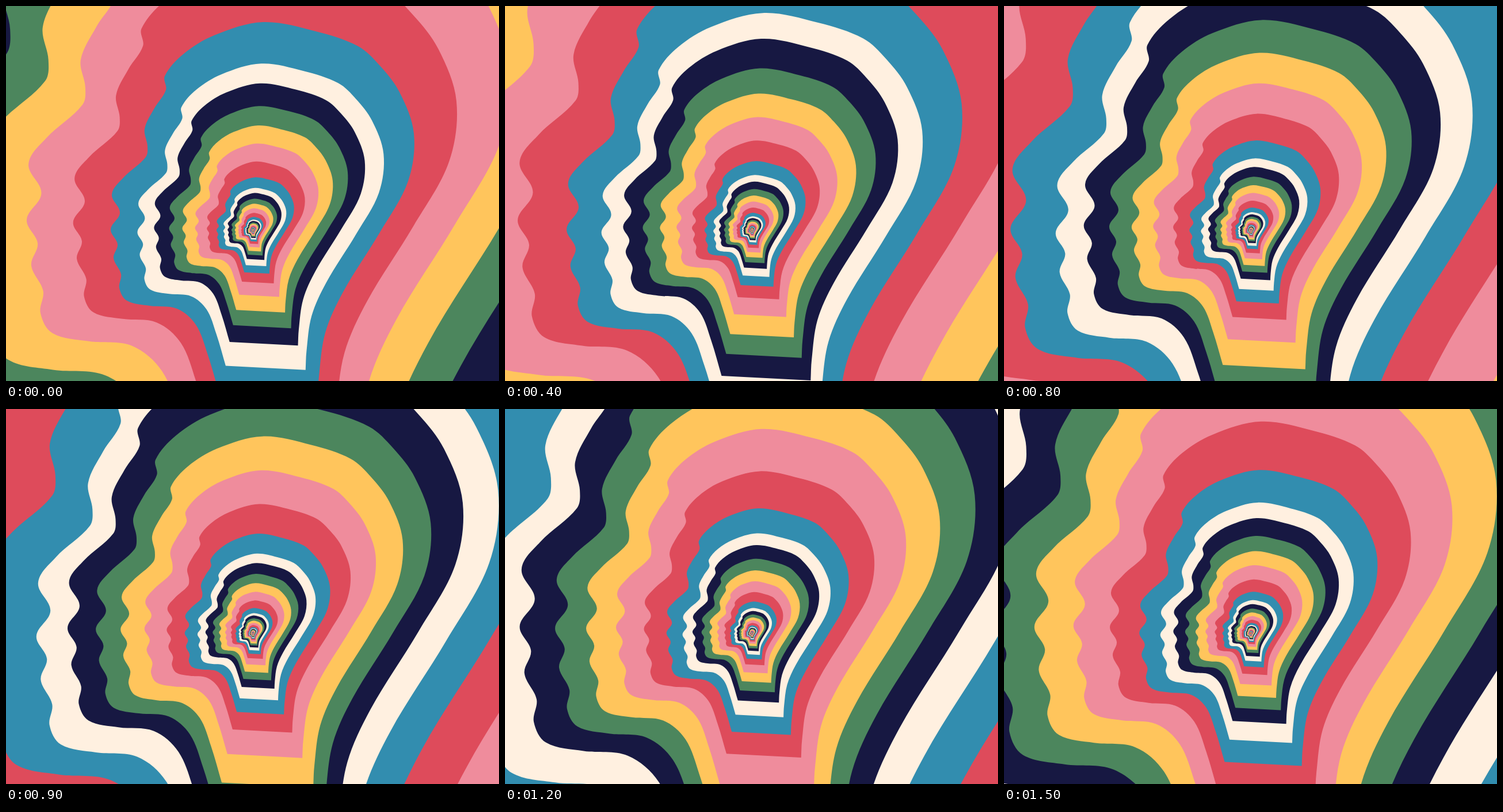
An HTML page with a canvas for the animation above (1.6 s loop, 857x653 px).

```html
<!DOCTYPE html>
<html lang="en">
<head>
<meta charset="utf-8">
<title>Endless heads</title>
<style>
  html, body { margin: 0; width: 100%; height: 100%; overflow: hidden; background: #328daf; }
  canvas { display: block; }
</style>
</head>
<body>
<canvas id="stage" width="857" height="653"></canvas>
<script>
const ctx = document.getElementById('stage').getContext('2d');
const LOOP = 1600, STEP = 100;
const CENTER = { x: 429, y: 391 };
const CYCLE = 3.914; // size ratio between two heads of the same colour

// Key points of the head; a smooth curve runs through each part in turn.
const NECK_FRONT = [[371, 676], [351, 608], [330, 555], [297, 527]];
const JAW = [[250, 522], [210, 513], [197, 491], [200, 467]];
const MOUTH_AND_NOSE = [[187, 439], [194, 415], [182, 389], [198, 360], [184, 328], [204, 299]];
const BROW = [[243, 263], [246, 244], [241, 214], [258, 178], [278, 146], [276, 122]];
const SKULL = [[308, 84], [362, 51], [447, 28], [538, 44], [612, 70], [650, 104], [684, 150], [709, 222]];
const NECK_BACK = [[699, 305], [650, 394], [586, 498], [555, 569], [544, 645], [542, 685]];

// Largest first: colour, relative size and small vertical shift.
const LAYERS = [
  ['#328daf', 1, 0],
  ['#fff0e0', 0.812, 4],
  ['#171842', 0.695, -4],
  ['#4c865d', 0.589, -3],
  ['#ffc55c', 0.496, -3],
  ['#ef8c9c', 0.4065, -4],
  ['#de4b5b', 0.323, -3]
];

// Zoom at key steps; growth is exponential in between.
const ZOOM = [[0, 1], [4, 1.303], [6, 1.506], [8, 1.691], [10, 2.08], [12, 2.35], [15, 3.07], [16, CYCLE]];

function smoothPath(points) {
  const path = new Path2D();
  const last = points.length - 1;
  const direction = i => {
    const [ax, ay] = points[Math.max(i - 1, 0)];
    const [bx, by] = points[Math.min(i + 1, last)];
    const length = Math.hypot(bx - ax, by - ay);
    return [(bx - ax) / length, (by - ay) / length];
  };
  path.moveTo(...points[0]);
  for (let i = 0; i < last; i++) {
    const [ax, ay] = points[i], [bx, by] = points[i + 1];
    const [ux, uy] = direction(i), [vx, vy] = direction(i + 1);
    const handle = Math.hypot(bx - ax, by - ay) / 3;
    path.bezierCurveTo(ax + ux * handle, ay + uy * handle,
                       bx - vx * handle, by - vy * handle, bx, by);
  }
  path.closePath();
  return path;
}

const head = smoothPath(
  [...NECK_FRONT, ...JAW, ...MOUTH_AND_NOSE, ...BROW, ...SKULL, ...NECK_BACK]
    .map(([x, y]) => [x - CENTER.x, y - CENTER.y])
);

function zoomAt(step) {
  const i = ZOOM.findIndex(([end]) => end > step);
  const [s0, z0] = ZOOM[i - 1], [s1, z1] = ZOOM[i];
  return z0 * (z1 / z0) ** ((step - s0) / (s1 - s0));
}

function draw(time) {
  const zoom = zoomAt(Math.floor((time % LOOP) / STEP));
  for (let cycle = 2; cycle >= -4; cycle--) {
    const scale = zoom * CYCLE ** cycle;
    for (const [color, size, shift] of LAYERS) {
      ctx.setTransform(scale * size, 0, 0, scale * size, CENTER.x, CENTER.y + shift * scale);
      ctx.fillStyle = color;
      ctx.fill(head);
    }
  }
}

function tick(now) {
  draw(now);
  requestAnimationFrame(tick);
}

draw(0);
requestAnimationFrame(tick);
</script>
</body>
</html>
```
